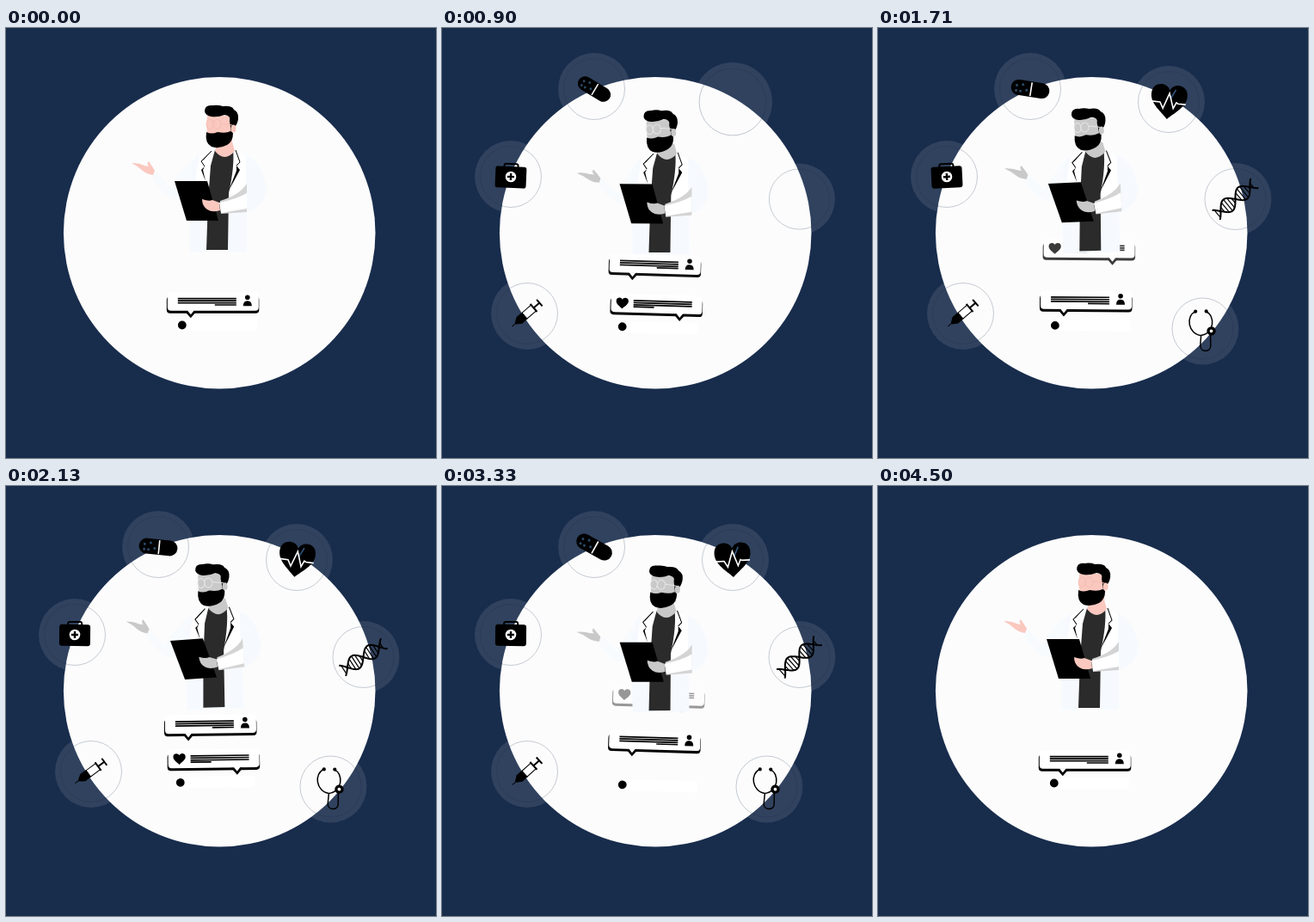
Animation of 500 by 500 pixels, one loop 4.53 s. Source, as an HTML page:

```html
<!DOCTYPE html>
<html>
<head>
<meta charset="utf-8">
<style>
html, body { margin: 0; width: 100%; height: 100%; overflow: hidden; background: #182c4c; }
svg { display: block; width: 100vw; height: 100vh; }
.skin { fill: var(--skin); }
.line { fill: none; stroke: #000; }
</style>
</head>
<body>
<svg id="stage" viewBox="0 0 500 500">
  <defs>
    <path id="heart" d="M0 20C-8 12-21 4-21-8C-21-17-15-20-10-20C-5-20-1-17 0-13C1-17 5-20 10-20C15-20 21-17 21-8C21 4 8 12 0 20Z"/>
    <g id="card">
      <rect x="-54" y="-9" width="107.500" height="19.500" rx="4"/>
      <rect x="-53" y="-14" width="106" height="21.500" rx="4" fill="#fff"/>
    </g>
    <g id="msgPerson">
      <use href="#card"/>
      <path d="M-33 8L-26 16-19 8Z"/><path d="M-30 7L-26 12-22 7Z" fill="#fff"/>
      <path class="line" stroke-width="1.7" d="M-41-6.5H27M-41-4H27M-41-1.5H27M2 .8H27"/>
      <circle cx="40" cy="-8" r="2.800"/><path d="M35 2Q35-4 40-4Q45-4 45 2Z"/>
    </g>
    <g id="msgHeart">
      <use href="#card"/>
      <path d="M20 8L27 16 34 8Z"/><path d="M23 7L27 12 31 7Z" fill="#fff"/>
      <path class="line" stroke-width="1.7" d="M-27-6.5H41M-27-4H41M-27-1.5H41M-27 .8H-3"/>
      <use href="#heart" transform="translate(-40 -3) scale(.34 .32)"/>
    </g>
    <g id="kit">
      <path class="line" stroke-width="2" d="M-8-11V-13Q-8-15-6-15H6Q8-15 8-13V-11"/>
      <rect x="-18" y="-12" width="36" height="25" rx="3"/>
      <circle r="6.300" fill="#fff"/><path class="line" stroke-width="2.400" d="M-4 0H4M0-4V4"/>
    </g>
    <g id="syringe">
      <path class="line" d="M-23 0H-16"/>
      <path d="M-18-1L-12-5H-3V5H-12L-18 1Z"/>
      <path fill="#fff" stroke="#000" d="M-4-4.500H10V4.500H-4Z"/>
      <path class="line" stroke-width="2" d="M10-6V6M10 0H19M19-5V5"/>
    </g>
    <g id="pill">
      <rect x="-22.500" y="-9" width="45" height="18" rx="9"/>
      <path stroke="#fff" stroke-width="1.600" d="M1-8V8"/>
      <path stroke="#2a4a68" stroke-width="3" stroke-linecap="round" d="M-16-2h0M-11 4h0M-9-4h0M-4 2h0M-16 4h0"/>
    </g>
    <g id="pulse">
      <use href="#heart"/>
      <path d="M7-15L2-4" stroke="#31567f" stroke-width="1.600"/>
      <path fill="none" stroke="#fff" stroke-width="1.600" d="M-20 1H-10L-6 8 0-10 6 7 9 0 11 1H20"/>
    </g>
    <g id="dna" class="line" stroke-width="2"></g>
    <g id="scope">
      <path class="line" stroke-width="1.500" d="M-8-20C-20-15-17 6-2 8C14 6 15-15 4-20M-2 8L-3 20C-3 28 9 28 9 20V6"/>
      <circle cx="-8" cy="-20" r="2.100"/><circle cx="4.500" cy="-20" r="2.100"/>
      <circle cx="10" cy="3" r="5.200"/><circle cx="10" cy="3" r="1.900" fill="#fff"/>
    </g>
  </defs>

  <circle cx="248.200" cy="238.300" r="181.300" fill="#fcfcfc"/>
  <g id="badges"></g>
  <g id="phone">
    <g id="messages"></g>
    <rect x="198" y="339" width="94" height="13" rx="4" fill="#fff"/>
    <circle cx="204.800" cy="345.500" r="4.900"/>
  </g>

  <g id="hand">
    <path fill="#f8fbfe" d="M172 163L190 185 216 152 226 165 200 200Q184 198 169 173Z"/>
    <path class="skin" d="M146 157Q155 157 161 160L166 161Q163 157 166 155L170 161 173 166 171 171Q164 170 159 166Q154 161 146 157Z"/>
  </g>
  <g id="torso">
    <path fill="#f6fafe" d="M240 142L222 149Q212 165 214 190V260H280V214Q300 208 303 188Q298 152 276 147L264 142Z"/>
    <path fill="#fff" d="M240 142L225 149 218 190 235 215 240 150ZM265 142L279 149V200L258 212Z"/>
    <path fill="#2b2b2b" d="M243 142Q254 155 264 142Q266 160 259 192L258 258H233L235 200 238 160Z"/>
    <path class="skin" d="M246 132H263L266 143Q254 157 243 143Z"/>
    <path class="line" d="M239 143L227 155 231 161M267 142L272 156 268 160"/>
    <path d="M231 161L227 165 232 178 229 165ZM268 160L272 165 259 189 268 166ZM239 143L230 153 227 155Z"/>
  </g>
  <g id="clip">
    <path d="M196 178H234L247 224H210Z"/>
    <path fill="#d4d4d4" d="M280 181Q272 194 249 201L250 216 280 214Z"/>
    <path fill="#fff" d="M280 192Q268 199 248 203L250 215 280 210Z"/>
    <path class="skin" d="M228 199Q236 202 240 200L248 203 249 212Q240 215 234 211Q228 207 228 199Z"/>
  </g>
  <g id="head">
    <path class="skin" d="M234 102H263V132H236Q232 118 234 102Z"/>
    <path d="M231 97Q231 89 240 90Q247 89 252 91Q263 90 265 95Q271 98 270 106Q269 112 266 115L262 122 260 108Q262 102 254 101Q246 104 239 103Q232 102 231 97Z"/>
    <path d="M233 121Q239 124 246 121Q256 123 261 120L264 122Q264 132 257 136Q247 141 239 138Q231 134 233 121Z"/>
    <ellipse class="skin" cx="264.500" cy="117" rx="3" ry="4.500"/>
    <path id="glasses" fill="none" d="M241 112a4 5.500 0 1 1-8 0a4 5.500 0 1 1 8 0a4.500 5.500 0 1 1 9 0a4.500 5.500 0 1 1-9 0M250 111L263 113"/>
  </g>
</svg>
<script>
const LOOP = 4530, STEP = LOOP / 6, TURN = 2 * Math.PI / LOOP;
const $ = id => document.getElementById(id);
const span = (t, start, length) => Math.min(1, Math.max(0, (t - start) / length));
const smooth = x => x * x * (3 - 2 * x);
const back = (x, s) => Math.max(0, 1 + (s + 1) * (x - 1) ** 3 + s * (x - 1) ** 2);

// Two swings per loop, unequal by a slower drift; zero at the loop point
const sway = (t, fast, drift, lag = 0) =>
  fast * (1 - Math.cos(2 * TURN * t)) - drift * (1 - Math.cos(TURN * t)) + lag * Math.sin(TURN * t);

// Pivot, then the sway of x, y and angle
const parts = {
  phone: { pivot: '148 510', x: [0, 0], y: [0, 0], angle: [1.1, .4] },
  hand: { pivot: '160 163', x: [7.5, 3.5], y: [5.6, 0], angle: [-3.5, 0] },
  torso: { pivot: '248 200', x: [5.2, 3], y: [1.8, .4], angle: [.3, 1] },
  clip: { pivot: '222 201', x: [6.5, 2], y: [1.9, 0], angle: [1, 2] },
  head: { pivot: '249 114', x: [6, 5, -3], y: [2.2, 0, 1.5], angle: [0, 1.2, -3] }
};

// Listed in order of leaving; the icon tilts by swing around tilt, most at peak
const badges = [
  { icon: 'kit', x: 80, y: 173, enter: 110, tilt: 1, swing: 4, peak: 2730 },
  { icon: 'syringe', x: 99, y: 332, enter: 0, tilt: -39, swing: 4, peak: 2430 },
  { icon: 'pill', x: 177, y: 71, enter: 430, tilt: 18, swing: -13, peak: 2000 },
  { icon: 'pulse', x: 338, y: 86, enter: 590, tilt: 2, swing: 6, peak: 2000 },
  { icon: 'dna', x: 415.5, y: 199, enter: 750, tilt: -37, swing: 6, peak: 2430 },
  { icon: 'scope', x: 377.5, y: 349.5, enter: 910, tilt: 1, swing: 2, peak: 2730 }
];

function buildDna() {
  const wave = x => 8.5 * Math.sin(Math.PI * x / 22);
  const strand = sign => {
    let d = '';
    for (let x = -29; x <= 29; x++) d += (d ? 'L' : 'M') + x + ' ' + sign * wave(x);
    return d;
  };
  let rungs = '';
  for (let x = -27; x <= 27; x += 4) rungs += `M${x} ${wave(x)}V${-wave(x)}`;
  $('dna').innerHTML = `<path d="${strand(1)}${strand(-1)}"/><path stroke-width="1.2" d="${rungs}"/>`;
}

buildDna();
$('badges').innerHTML = badges.map(({ icon }) =>
  `<g><circle r="42" fill="#fff" fill-opacity=".1"/>
   <circle r="35.5" fill="none" stroke="#182c4c" stroke-opacity=".3" stroke-width=".8"/></g>
   <use href="#${icon}"/>`).join('');
for (let k = 0; k < 7; k++)
  $('messages').innerHTML += `<use href="#${k % 2 ? 'msgHeart' : 'msgPerson'}"/>`;

const place = (node, x, y, angle, scale) =>
  node.setAttribute('transform', `translate(${x} ${y}) rotate(${angle}) scale(${scale})`);

const pop = (t, enter, leave, inTime, outTime, overshoot) =>
  back(t < leave ? span(t, enter, inTime) : 1 - span(t, leave, outTime), overshoot);

function draw(t) {
  for (const [id, { pivot, x, y, angle }] of Object.entries(parts))
    $(id).setAttribute('transform',
      `translate(${sway(t, ...x)} ${sway(t, ...y)}) rotate(${sway(t, ...angle)} ${pivot})`);

  badges.forEach(({ x, y, enter, tilt, swing, peak }, i) => {
    const disc = $('badges').children[2 * i], icon = disc.nextElementSibling;
    const leave = 3370 + 140 * i;
    place(disc, x, y, 0, pop(t, enter, leave, 450, 400, 1.9));
    place(icon, x, y, tilt + swing * Math.cos(2 * TURN * (t - peak)),
      pop(t, enter + 330, leave, 350, 250, 1));
  });

  // Each message pops in, moves up one slot, then fades; the newest stays for the next loop
  [...$('messages').children].forEach((node, k) => {
    const up = smooth(span(t, STEP * k + 165, 250));
    const out = span(t, Math.min(STEP * (k + 1) + 130, k < 6 ? 4170 : LOOP), 300);
    const scale = k ? smooth(span(t, STEP * (k - 1) + 320, 180)) : 1;
    place(node, k % 2 ? 244 : 240.8, 321.2 - 40 * (up + 1 - (1 - out) ** 3), 0, scale);
    node.setAttribute('opacity', 1 - out);
  });

  const grey = t >= 700 && t < 4340;
  $('stage').style.setProperty('--skin', grey ? '#c9c9c9' : '#fac8bf');
  $('glasses').setAttribute('stroke', grey ? '#e6e6e6' : '#f5bdb3');
}

function tick() {
  draw(performance.now() % LOOP);
  requestAnimationFrame(tick);
}
tick();
</script>
</body>
</html>
```
